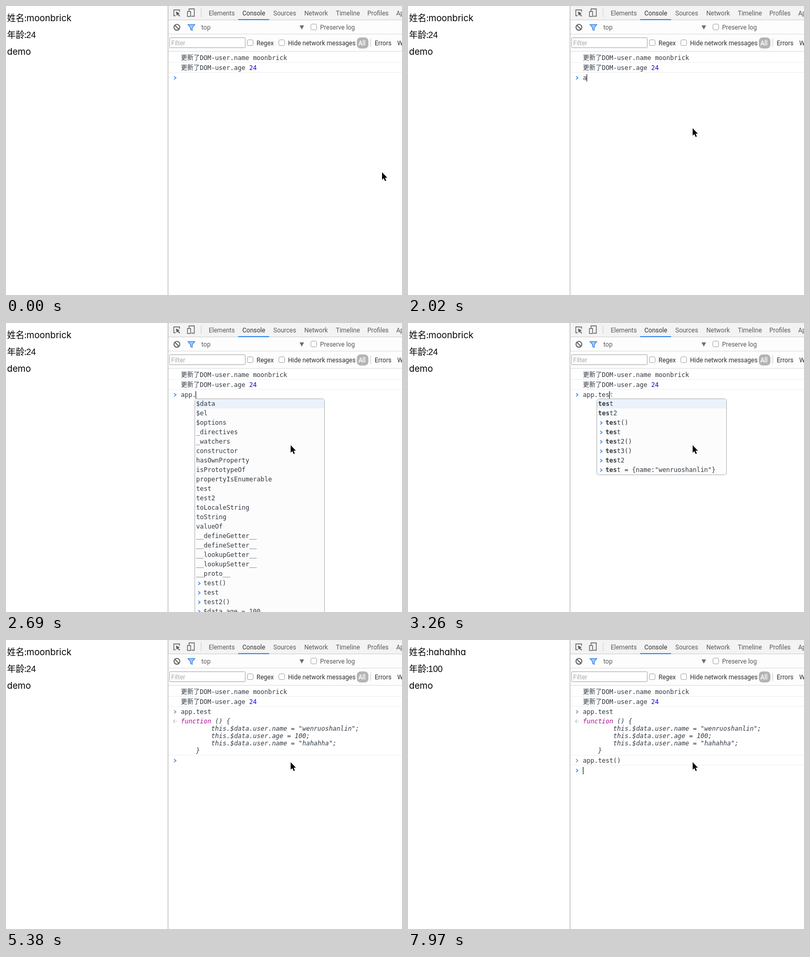
Write an HTML page that moves like this. It is 754 px wide and 551 px high and loops after 8000 ms.

```html
<!DOCTYPE html>
<html lang="zh-CN">
<head>
<meta charset="utf-8">
<title>Console demo</title>
<style>
  html, body { margin: 0; width: 100%; height: 100%; overflow: hidden; background: #fff; }
  svg { display: block; width: 754px; height: 551px; }
  text { white-space: pre; }
  .page { font: 17px Inter, "Noto Sans CJK SC", sans-serif; font-feature-settings: "cv11"; fill: #000; }
  .page .han { font: 16.5px "Noto Sans CJK SC", sans-serif; }
  .page .num { font: 16.5px "Liberation Sans", sans-serif; }
  .ui { font: 12px Roboto, sans-serif; fill: #5a5a5a; }
  .dark { fill: #303030; }
  .mono { font: 12px "DejaVu Sans Mono", "Noto Sans CJK SC", monospace; fill: #303942; }
  .num-lit { fill: #1c00cf; }
  .code { font-style: italic; }
  .key { fill: #aa0d91; }
  .ghost { fill: #a0a0a0; }
  .b { font-weight: 700; }
  .box { fill: #fff; stroke: #a6a6a6; }
  .rule { stroke: #f0f0f0; }
  .chev { fill: none; stroke: #3b82f0; stroke-width: 1.6; }
  .old { stroke: #808080; stroke-width: 1.3; }
  .icon { fill: none; stroke: #5a5a5a; stroke-width: 1.3; }
</style>
</head>
<body>
<svg viewBox="0 0 754 551">
  <rect width="754" height="551" fill="#fff"/>

  <g class="page">
    <text class="han" x="2" y="29">姓名</text><text x="34.5" y="29">:</text>
    <text id="name" x="39" y="29"></text>
    <text class="han" x="2" y="61">年龄</text><text x="34.5" y="61">:</text>
    <text id="age" class="num" x="38.5" y="61"></text>
    <text x="2" y="93">demo</text>
  </g>

  <rect x="309" width="445" height="26" fill="#f3f3f3"/>
  <rect x="309" y="27" width="445" height="59" fill="#fdfdfd"/>
  <path d="M309 26.5H754" stroke="#cfcfcf"/>
  <path d="M309 53.5H754M309 86.5H754" stroke="#dcdcdc"/>
  <path d="M371.5 5V21M694.5 62V78" stroke="#cccccc"/>
  <path d="M308.5 0V551" stroke="#a8a8a8"/>
  <rect x="442" y="25" width="59" height="2" fill="#3b8cf0"/>

  <g class="icon">
    <path d="M323 18.5H319.5V7.5H330.5V11"/>
    <path d="M323.5 10.5L331 14L328 15L331.5 19L330 20L327 16.5L325 18.5Z" fill="#5a5a5a" stroke="none"/>
    <path d="M348.5 10V5.5H358.5V19.5H353"/>
    <rect x="345.5" y="10.5" width="6" height="9.5" fill="#f3f3f3"/>
    <circle cx="325.4" cy="40.6" r="5.5" stroke-width="1.8"/>
    <path d="M321.6 36.8L329.2 44.4" stroke-width="1.8"/>
  </g>
  <path d="M346.5 35.5H359.5L354.6 41.3V46.5L351.4 44.8V41.3Z" fill="#a9cbfa" stroke="#3b82f0" stroke-width="1.3"/>
  <path d="M559 37H567.5L563.2 45Z" fill="#6e6e6e"/>

  <g class="ui">
    <text x="386" y="18">Elements</text>
    <text x="450" y="18" class="dark">Console</text>
    <text x="509" y="18">Sources</text>
    <text x="568" y="18">Network</text>
    <text x="628" y="18">Timeline</text>
    <text x="688" y="18">Profiles</text>
    <text x="743" y="18">Application</text>
    <text x="372" y="45">top</text>
    <text x="598" y="45">Preserve log</text>
    <rect class="box" x="311.5" y="60.5" width="144" height="19" rx="1"/>
    <text x="314.5" y="75" fill="#a9a9a9" style="fill:#a9a9a9">Filter</text>
    <rect class="box" x="580.5" y="34.5" width="11" height="11" rx="2.5"/>
    <rect class="box" x="459.5" y="64.5" width="11" height="11" rx="2.5"/>
    <rect class="box" x="519.5" y="64.5" width="11" height="11" rx="2.5"/>
    <g class="dark">
      <text x="477" y="75">Regex</text>
      <text x="537" y="75">Hide network messages</text>
      <text x="702" y="75">Errors</text>
      <text x="745" y="75">Warnings</text>
    </g>
    <rect x="668" y="60" width="22" height="21" rx="7" fill="#b4b4b4"/>
    <text x="671" y="75" style="fill:#fff;stroke:#fff;stroke-width:.3">All</text>
  </g>

  <g class="mono">
    <path class="rule" d="M309 107.5H754M309 126.5H754"/>
    <text x="333" y="103">更新了DOM-user.name moonbrick</text>
    <text x="333" y="122">更新了DOM-user.age <tspan class="num-lit">24</tspan></text>
    <g id="log"></g>
    <g id="prompt"></g>
    <g id="menu"></g>
  </g>

  <path id="pointer" d="M0 0V14.2L3.2 11.2L5.7 16.8L8 15.8L5.5 10.4H10Z"
        fill="#000" stroke="#fff" stroke-width="1.2" paint-order="stroke"/>
</svg>

<script>
const LOOP = 8000, CHAR = 7.224, LEFT = 333, ROW = 18;
const $ = id => document.getElementById(id);

const history = [
  'test()', 'test', 'test2()', '', '$data.age = 100', '$data.name = "wenruoshanlin"',
  "$data.address.info.city = 'aaa'", '$data.user', '$data.user.name = "wenruoshanlin"',
  'test3()', 'test2', '_directives[0].update()', '_directives[0].update',
  "_directives[0].el.nodeValue = 'jskdfj'", '_directives[0].el.tagName',
  '_directives[0].el.nodeType', '_directives[0].el', '_directives[0]',
  '_directives[3]', '_directives', '_watchers'
];
const members = ('$data $el $options _directives _watchers constructor hasOwnProperty ' +
  'isPrototypeOf propertyIsEnumerable test test2 toLocaleString toString valueOf ' +
  '__defineGetter__ __defineSetter__ __lookupGetter__ __lookupSetter__ __proto__').split(' ');
const tests = ['test()', 'test', 'test2()', 'test3()', 'test2', 'test = {name:"wenruoshanlin"}'];

const menus = {
  app: { x: 330, w: 440, own: ['app', 'applicationCache'], past: history.map(h => h ? 'app.' + h : 'app') },
  all: { x: 359, w: 247, own: members, past: ['test()', 'test', 'test2()', '$data.age = 100'] },
  t: { x: 359, w: 247, own: ['test', 'test2', 'toLocaleString', 'toString'], past: tests },
  te: { x: 359, w: 247, own: ['test', 'test2'], past: tests }
};

// time, typed text, caret, log length, menu, bold letters
const steps = [
  [0, '', 0, 0], [690, '', 1, 0], [1090, '', 0, 0], [1600, '', 1, 0],
  [2020, 'a', 1, 0], [2040, 'a', 1, 0, 'app', 1],
  [2170, 'ap', 1, 0, 'app', 1], [2190, 'ap', 1, 0, 'app', 2],
  [2340, 'app', 1, 0, 'app', 2], [2360, 'app', 1, 0, 'app', 3],
  [2690, 'app.', 1, 0, 'all', 0], [2900, 'app.t', 1, 0, 't', 1],
  [3050, 'app.te', 1, 0, 't', 1], [3080, 'app.te', 1, 0, 'te', 2],
  [3230, 'app.tes', 1, 0, 'te', 2], [3260, 'app.tes', 1, 0, 'te', 3],
  [4430, 'app.test', 1, 0],
  [4810, '', 0, 1], [4840, '', 0, 2], [4870, '', 1, 2], [5380, '', 0, 2],
  [5950, 'app.test', 1, 2], [6370, 'app.test', 0, 2], [6850, 'app.test', 1, 2],
  [6940, 'app.test(', 1, 2], [7200, 'app.test()', 1, 2], [7710, 'app.test()', 0, 2],
  [7940, '', 1, 3]
];

// start time, gap between moves, number of moves, end position
const moves = [[30, 50, 2, 629, 293], [230, 37.7, 10, 555, 253], [870, 44, 5, 542, 233]];

const text = (x, y, s, cls = '') => `<text x="${x}" y="${y}" class="${cls}">${s}</text>`;
const chevron = (x, y, cls = '') =>
  `<path class="chev ${cls}" d="M${x} ${y - 3}L${x + 3.5} ${y}L${x} ${y + 3}"/>`;
const rule = y => `<path class="rule" d="M309 ${y}H754"/>`;

const entries = [
  chevron(320, 137, 'old') + text(LEFT, 141, 'app.test'),
  '<path class="chev old" style="stroke:#b5b5b5" d="M322 152L318.8 155L322 158M323.6 155H325"/>' +
    ['<tspan class="key">function</tspan> () {',
     '        this.$data.user.name = "wenruoshanlin";',
     '        this.$data.user.age = 100;',
     '        this.$data.user.name = "hahahha";',
     '    }'].map((s, i) => text(LEFT, 159 + 14 * i, s, 'code')).join('') + rule(219.5),
  chevron(320, 230, 'old') + text(LEFT, 234, 'app.test()') + rule(238.5)
];
const promptY = [137, 156, 230, 249];

function drawMenu(key, bold) {
  if (!key) return '';
  const { x, w, own, past } = menus[key];
  const h = (own.length + past.length) * ROW + 1;
  const item = (s, i, inset) => text(x + 3 + inset, 158 + ROW * i,
    `<tspan class="b">${s.slice(0, bold)}</tspan>${s.slice(bold)}`);
  return `<rect x="${x + .5}" y="144.5" width="${w}" height="${h}" rx="4" fill="#fcfcfc" stroke="#b0b0b0"/>` +
    `<rect x="${x + 1}" y="145" width="${w - 1}" height="${ROW}" rx="3" fill="#ebf2fb"/>` +
    own.map((s, i) => item(s, i, 0)).join('') +
    past.map((s, i) => {
      const n = i + own.length;
      return chevron(x + 7, 154.5 + ROW * n) + item(s, n, 14);
    }).join('');
}

function drawPrompt(typed, caret, y, key) {
  const end = LEFT + typed.length * CHAR;
  const part = typed.split('.').pop();
  const ghost = key && part ? menus[key].own[0].slice(part.length) : '';
  return chevron(320, y) + text(LEFT, y + 4, typed) + text(end, y + 4, ghost, 'ghost') +
    (caret ? `<rect x="${Math.floor(end)}" y="${y - 7}" width="1" height="14" fill="#000"/>` : '');
}

function pointerAt(t) {
  let x = 716, y = 317;
  for (const [start, gap, count, tx, ty] of moves) {
    if (t < start) break;
    const p = Math.min(1, (Math.floor((t - start) / gap) + 1) / count);
    const e = p * (1.6 - .6 * p);
    x += (tx - x) * e;
    y += (ty - y) * e;
  }
  return `translate(${x.toFixed(1)} ${y.toFixed(1)})`;
}

let shown;
function frame() {
  const t = performance.now() % LOOP;
  const step = steps.findLast(s => s[0] <= t);
  if (step !== shown) {
    const [, typed, caret, count, key, bold] = shown = step;
    $('log').innerHTML = entries.slice(0, count).join('');
    $('prompt').innerHTML = drawPrompt(typed, caret, promptY[count], key);
    $('menu').innerHTML = drawMenu(key, bold);
  }
  const updated = t >= 7970;
  $('name').textContent = updated ? 'hahahha' : 'moonbrick';
  $('age').textContent = updated ? '100' : '24';
  $('pointer').setAttribute('transform', pointerAt(t));
  requestAnimationFrame(frame);
}
frame();
</script>
</body>
</html>
```
